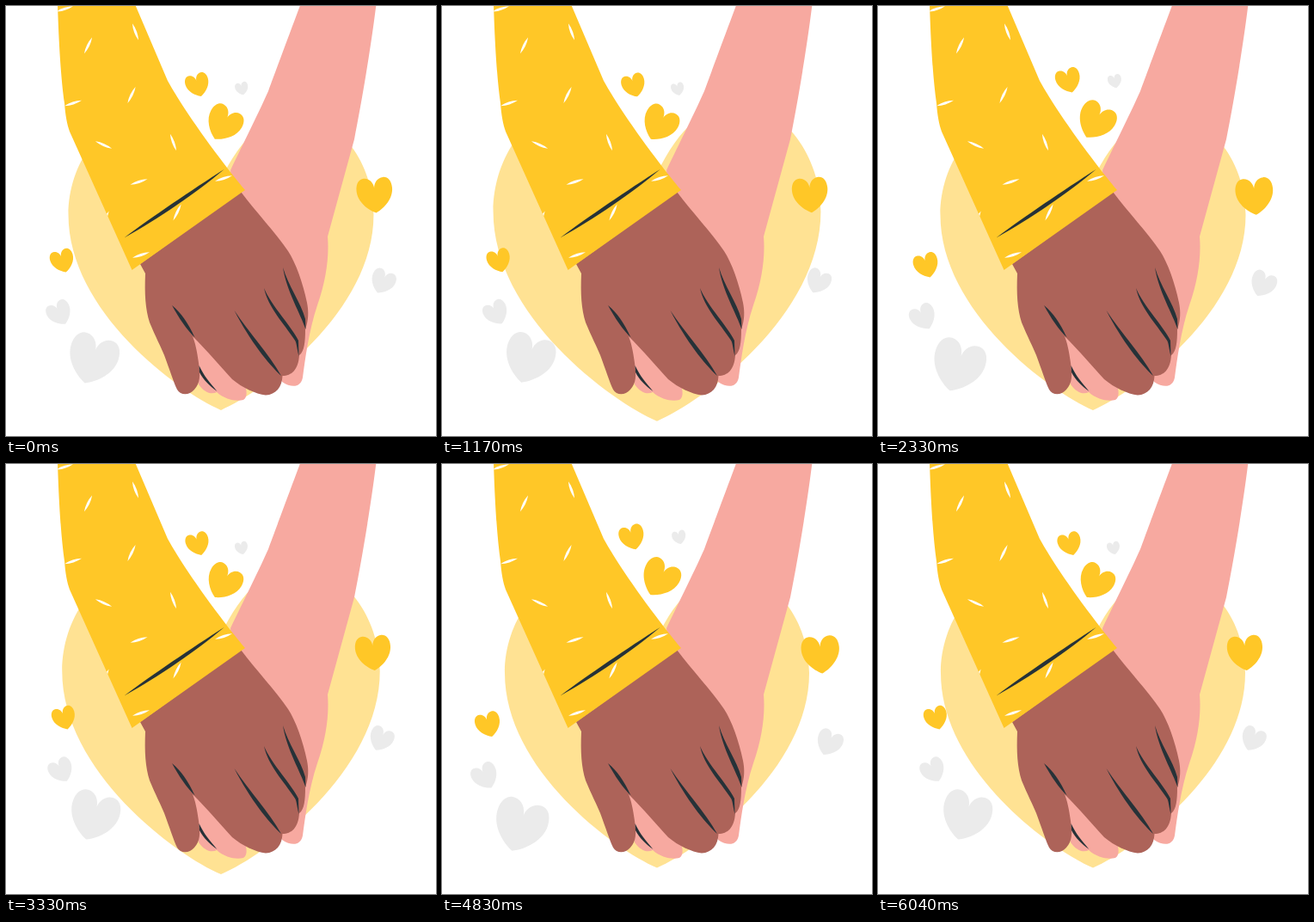
Write an HTML page that moves like this. It is 500 by 500 pixels and loops after 6.08 s.

```html
<!DOCTYPE html>
<html lang="en">
<head>
<meta charset="utf-8">
<title>Holding hands</title>
<style>
  html, body { margin: 0; width: 100%; height: 100%; overflow: hidden; background: #fff; }
  svg { display: block; width: 100vw; height: 100vh; }
  marker { overflow: visible; }
  .flat { marker: url(#flat); }
  .steep { marker: url(#steep); }
  .falling { marker: url(#falling); }
</style>
</head>
<body>
<svg viewBox="0 0 500 500">
  <defs>
    <path id="heart" d="M0 50C-24 39-50 14-50-16C-50-36-40-48-27-48C-11-48-1-34 0-20C1-34 11-48 27-48C40-48 50-36 50-16C50 14 24 39 0 50Z"/>
    <path id="dash" fill="#fff" d="M-10.500 0Q0-3 10.500 0Q0 3-10.500 0Z"/>
    <path id="sleeve" d="M60-2C61.500 45 64 85 68 113C69 127 71 138 74 146L146.500 307L278 214C262 195 215 135 188 87L150-2Z"/>
    <clipPath id="sleeveClip"><use href="#sleeve"/></clipPath>
    <marker id="flat" markerUnits="userSpaceOnUse" orient="-18"><use href="#dash"/></marker>
    <marker id="steep" markerUnits="userSpaceOnUse" orient="-64"><use href="#dash"/></marker>
    <marker id="falling" markerUnits="userSpaceOnUse" orient="70"><use href="#dash"/></marker>
  </defs>

  <path id="backdrop" fill="#ffe293" d="M250 469.500C200 448 73 355 73 243C73 184 112 128 163 128C198 128 226 152 250 202C274 152 302 128 337 128C388 128 427 184 427 243C427 355 300 448 250 469.500Z"/>
  <g id="greys" fill="#ebebeb">
    <use href="#heart" transform="translate(274 97.700) rotate(-14) scale(.15)"/>
    <use href="#heart" transform="translate(436 320) rotate(25) scale(.28)"/>
    <use href="#heart" transform="translate(64.300 356.300) rotate(-28) scale(.28)"/>
    <use href="#heart" transform="translate(102 409.500) rotate(18) scale(.57)"/>
  </g>
  <g id="yellows" fill="#ffc727">
    <use href="#heart" transform="translate(223.200 93) rotate(-17) scale(.27)"/>
    <use href="#heart" transform="translate(253 137.500) rotate(30) scale(.405)"/>
    <use href="#heart" transform="translate(427 219.500) rotate(-5) scale(.412)"/>
    <use href="#heart" transform="translate(67.600 295.500) rotate(-17) scale(.27)"/>
  </g>

  <g fill="#f7a9a0">
    <path d="M342.500-2C325 45 312 80 305 99C292 128 270 172 261 191L270 300L321 437C333 445 343 443 345 432C348 410 352 378 362 348C372 320 376 292 374 268L405 155C414 110 424 50 430.500-2Z"/>
    <path d="M214 378L224 440C231 450 239 452 245 449C255 458 268 460 276 458C281 455 280 448 278 440L240 395Z"/>
  </g>
  <path fill="#ad6359" d="M156 300L162 311C161 335 162 352 167 368C174 385 180 396 184 406C190 422 195 438 199 446C203 453 213 453 219 446C226 438 226 430 224 415C222 400 220 392 217 384C235 402 250 420 263 434C275 444 290 451 302 452.500C314 452 321 443 321.500 430C332 430 340 423 341 406C347 402 348 390 348 376C352 365 352 355 350 345C345 321 337 299 328 285C314 264 291 240 273 216Z"/>

  <use href="#sleeve" fill="#ffc727"/>
  <g fill="none" clip-path="url(#sleeveClip)">
    <path class="flat" d="M68 3.500L78 113L154.500 204.500L253 200.500L157 289.500"/>
    <path class="steep" d="M95.500 46L146 103.500L199 240L115 248"/>
    <path class="falling" d="M150.500 30L194.500 158.500"/>
    <use href="#dash" transform="translate(113.500 161.500) rotate(24)"/>
  </g>

  <g fill="#263238">
    <path d="M137.500 269.500C170 245 216 214 253.500 190C222 217 176 248 137.500 269.500Z"/>
    <path d="M193 348C203 356 212 369 219.500 385.500C210 376 201 363 193 348Z"/>
    <path d="M265.500 354C282 379 306 405 320 430C305 416 284 390 265.500 354Z"/>
    <path d="M300 328C308 348 334 375 340 389L340.500 407C338 397 338 391 335.500 388C323 369 305 351 300 328Z"/>
    <path d="M322 304C328 325 343 345 348 364L348.500 376C343 359 326 331 322 304Z"/>
    <path d="M224.500 418C230 430 237 438 245.500 448C237 442 229 434 225 426Z"/>
  </g>
</svg>
<script>
  const $ = id => document.getElementById(id);
  const LOOP = 6080, FRAMES = 146, STEP = LOOP / FRAMES;

  // Two linear beats per cycle, then rest.
  function beat(time, period) {
    const p = time % period / period;
    const bump = (start, peak, end) =>
      Math.max(0, Math.min((p - start) / (peak - start), (end - p) / (end - peak)));
    return 1 + .1 * (bump(0, .1, .3) + bump(.4, .5, .6));
  }
  const slow = time => beat(time, 8000);
  const fast = time => beat(time, 2000);
  const resting = time => slow(time) === 1 && fast(time) === 1;

  // A stretch where every part rests is cut down to one step.
  const times = [];
  for (let time = STEP / 2; times.length < FRAMES; time += STEP) {
    times.push(time);
    while (resting(time)) time++;
  }

  function scale(id, cy, s) {
    $(id).setAttribute('transform', `translate(250 ${cy}) scale(${s}) translate(-250 ${-cy})`);
  }

  function draw(ms) {
    const time = times[Math.floor((ms % LOOP + 5) / STEP) % FRAMES];
    scale('backdrop', 296, slow(time));
    scale('yellows', 194, fast(time));
    scale('greys', 263.5, fast(time));
  }

  const start = performance.now();
  function frame() {
    draw(performance.now() - start);
    requestAnimationFrame(frame);
  }
  frame();
</script>
</body>
</html>
```
